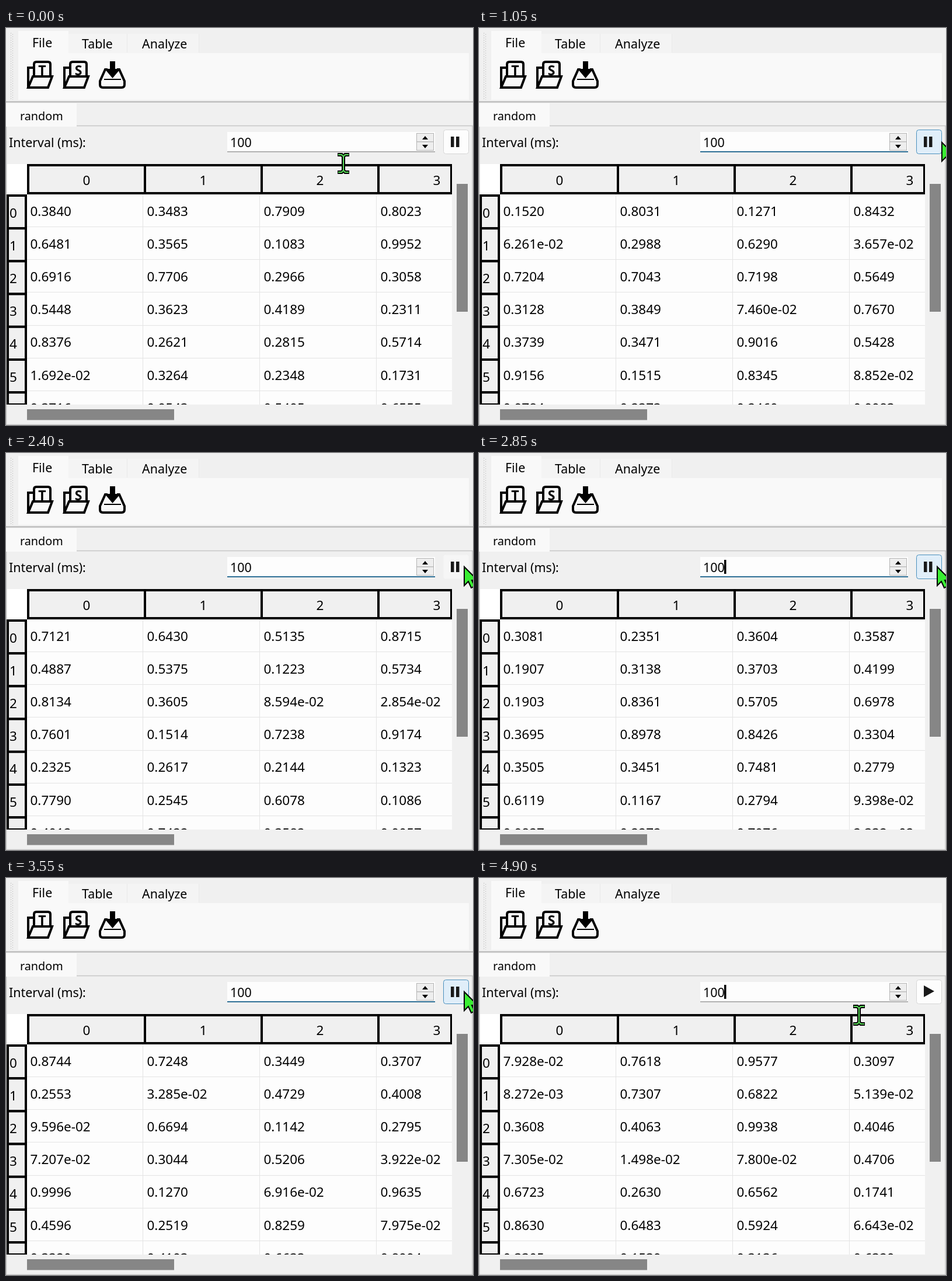
Animation, 800 px wide and 680 px high, one loop 5.15 s. Source, as an HTML page:

```html
<!DOCTYPE html>
<html lang="en">
<head>
<meta charset="utf-8">
<title>Random table</title>
<style>
  html, body { margin: 0; width: 100%; height: 100%; overflow: hidden; background: #f0f0f0; }
  svg { display: block; width: 100%; height: 100%; }
  text { font-family: "Noto Sans", "Open Sans", sans-serif; font-size: 22.5px; fill: #000; }
  .ui { font-size: 21.4px; }
  .icon { fill: none; stroke: #000; stroke-width: 4; }
  .letter { font-weight: 700; font-size: 23px; text-anchor: middle; }
  .back { fill: #f0f0f0; }
  .panel { fill: #f9f9f9; }
  .field { fill: #fdfdfd; }
  .line { fill: #e4e4e4; }
  .spin { fill: #eee; stroke: #b4b4b4; }
  .scroll { fill: #868686; }
  .head { fill: #f0f0f0; stroke: #000; stroke-width: 4; }
</style>
</head>
<body>
<svg viewBox="0 0 800 680">
  <defs>
    <clipPath id="cellClip"><rect x="36" y="285" width="728" height="360"/></clipPath>
    <clipPath id="rowClip"><rect x="1" y="285" width="35" height="360"/></clipPath>
    <g id="folder" class="icon">
      <path d="M38 102V68H48M38 102L46 83H79L72 102Z"/>
      <path d="M48 83V62Q48 58 52 58H72Q76 58 76 62V83"/>
    </g>
  </defs>
  <rect class="back" width="800" height="680"/>

  <!-- ribbon -->
  <path d="M8.500 8V123M11.500 10V123" stroke="#ccc" stroke-dasharray="2 2"/>
  <path d="M107 10H330V43H107Z" fill="#f4f4f4"/>
  <path d="M207.500 10V42M330.500 10V42" stroke="#e9e9e9"/>
  <path class="panel" d="M21 5H107V43H793V123H21Z"/>
  <text class="ui" x="45" y="33">File</text>
  <text class="ui" x="130" y="35">Table</text>
  <text class="ui" x="233" y="35">Analyze</text>
  <use href="#folder"/>
  <use href="#folder" x="62"/>
  <text class="letter" x="62" y="81">T</text>
  <text class="letter" x="124" y="81">S</text>
  <path class="icon" d="M174 71H170L161 91V97Q161 102 166 102H198Q203 102 203 97V91L194 71H190"/>
  <path d="M178 57H187V70H196L182.500 86L169 70H178ZM168 87H197V89H168Z"/>
  <rect y="125.500" width="800" height="2" fill="#b4b4b4"/>

  <!-- document tab and controls -->
  <path d="M121 167.500H799V679.500H.5V168" fill="none" stroke="#c6c6c6" stroke-width="1.500"/>
  <rect class="panel" y="129" width="121" height="40"/>
  <text x="24" y="158" style="font-size:19.800px">random</text>
  <text class="ui" x="5" y="204">Interval (ms):</text>
  <rect class="field" x="379" y="178" width="356" height="34"/>
  <rect id="underline" x="379" y="211" width="356" height="2"/>
  <rect class="spin" x="703.500" y="180.500" width="29" height="14.500"/>
  <rect class="spin" x="703.500" y="195" width="29" height="14.500"/>
  <path d="M713 191L718 185L723 191ZM713 200L718 206L723 200Z"/>
  <text x="384" y="204" style="font-size:21.500px">100</text>
  <rect id="caret" x="420" y="183" width="3.500" height="24"/>
  <rect id="button" x="749.500" y="174.500" width="43" height="41" rx="4"/>
  <path id="buttonIcon" fill="#191919"/>

  <!-- table -->
  <rect x="2" y="233" width="34" height="52" fill="#fff"/>
  <rect class="field" x="36" y="285" width="728" height="360"/>
  <g id="cells" clip-path="url(#cellClip)"></g>
  <g id="rowHeads" clip-path="url(#rowClip)"></g>
  <g id="colHeads"></g>
  <rect class="scroll" x="772" y="267" width="19" height="219"/>
  <rect class="scroll" x="36" y="653" width="252" height="18.500"/>

  <!-- pointers, each with its handle at 0,0 -->
  <g id="beam" fill="none">
    <path d="M-10-15H-3L0-12L3-15H10M-10 15H-3L0 12L3 15H10M0-13V13" stroke="#000" stroke-width="6"/>
    <path d="M-9-15H-3L0-12L3-15H9M-9 15H-3L0 12L3 15H9M0-13V13" stroke="#58d958" stroke-width="2"/>
  </g>
  <path id="arrow" d="M1 2V34L8 27L13 38L19 35L14 25H24Z" fill="#39ee32" stroke="#000" stroke-width="2"/>
</svg>
<script>
const LOOP = 5150, STEP = 50, ROWS = 7, COLS = 4, PITCH = 56.2;
const PAUSE = "M762 186H767.5V204H762ZM771 186H776.5V204H771Z";
const PLAY = "M762 184L780 194L762 204Z";
const $ = id => document.getElementById(id);

function add(parent, tag, attrs, text = "") {
  const node = document.createElementNS("http://www.w3.org/2000/svg", tag);
  for (const key in attrs) node.setAttribute(key, attrs[key]);
  node.textContent = text;
  return parent.appendChild(node);
}

const show = (id, on) => $(id).setAttribute("visibility", on ? "visible" : "hidden");
const within = (t, a, b) => t >= a && t < b;

// Seeded uniform value in 0..1 for one cell at one tick.
function noise(tick, index) {
  const n = Math.sin(tick * 78.233 + index * 12.9898 + 4.1) * 43758.5453;
  return n - Math.floor(n);
}

const format = v => v < .1
  ? v.toExponential(3).replace(/-(\d)$/, "-0$1")
  : v.toFixed(4);

const cells = [];
for (let r = 0; r < ROWS; r++) {
  const top = 285 + r * PITCH;
  add($("cells"), "rect", { class: "line", x: 36, y: Math.round(top + 55), width: 728, height: 1 });
  for (let c = 0; c < COLS; c++)
    cells.push(add($("cells"), "text", { x: 41.5 + c * 200, y: top + 36.5 }));
  add($("rowHeads"), "rect", { class: "head", x: 3, y: top + 2, width: 31, height: PITCH });
  add($("rowHeads"), "text", { x: 6, y: top + 39.5 }, r);
}
add($("rowHeads"), "rect", { x: 1, y: 643, width: 35, height: 2 });

add($("colHeads"), "path", { class: "head", d: "M763 235H38V283H763ZM238 235V283M438 235V283M638 235V283" });
add($("colHeads"), "rect", { class: "back", x: 764, y: 232, width: 3, height: 54 });
for (let c = 0; c < COLS; c++) {
  add($("cells"), "rect", { class: "line", x: 234 + c * 200, y: 285, width: 1, height: 360 });
  add($("colHeads"), "text", { x: 138 + c * 200, y: 269, "text-anchor": "middle" }, c);
}

// Pointer key points: time, x, y
const path = [
  [0, 578, 232], [550, 578, 232], [1000, 792, 194], [1850, 784, 193],
  [4100, 784, 193], [4650, 773, 496], [4850, 651, 235], [LOOP, 651, 235]
];

function pointerAt(t) {
  const i = path.findIndex(p => p[0] > t);
  const [t0, x0, y0] = path[i - 1], [t1, x1, y1] = path[i];
  const k = (t - t0) / (t1 - t0), ease = k * k * (3 - 2 * k);
  return [x0 + (x1 - x0) * ease, y0 + (y1 - y0) * ease];
}

function buttonColors(pressed, hover) {
  if (pressed) return ["#f6f6f6", "none"];
  return hover ? ["#e0eef9", "#4a90bd"] : ["#fdfdfd", "#d6d6d6"];
}

function draw(time) {
  const t = Math.floor(time % LOOP / STEP) * STEP;
  const pausedAt = t >= 4000 ? 4000 : within(t, 1750, 2400) ? 1750 : null;
  const tick = (pausedAt ?? t) / STEP;
  cells.forEach((cell, i) => cell.textContent = format(noise(tick, i)));

  const [x, y] = pointerAt(t);
  const inField = x < 700 && y < 260;
  for (const id of ["beam", "arrow"]) $(id).setAttribute("transform", `translate(${x} ${y})`);
  show("beam", inField);
  show("arrow", !inField);
  show("caret", Math.floor((t - 500) / 530) % 2 === 0);
  $("underline").setAttribute("fill", inField ? "#b2b2b2" : "#2f7096");

  const pressed = within(t, 1550, 1750) || within(t, 2350, 2500) || within(t, 3850, 4000);
  const [fill, stroke] = buttonColors(pressed, x > 749 && y < 216);
  $("button").setAttribute("fill", fill);
  $("button").setAttribute("stroke", stroke);
  $("buttonIcon").setAttribute("d", pausedAt === null ? PAUSE : PLAY);
}

const start = performance.now();
function frame() {
  draw(performance.now() - start);
  requestAnimationFrame(frame);
}
frame();
</script>
</body>
</html>
```
